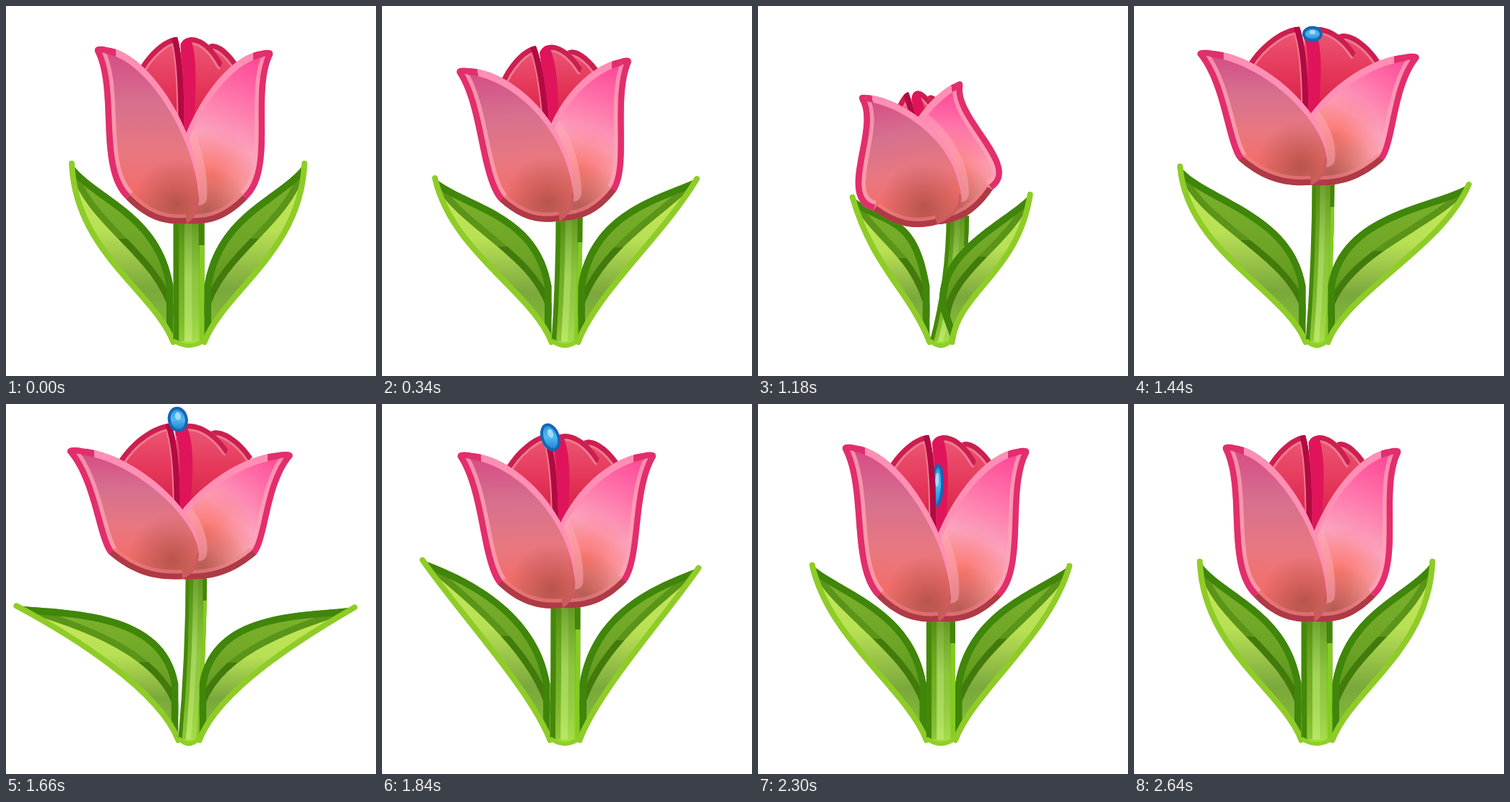
Write an HTML page with a canvas that moves like this. It is 512x512 px and loops after 2.68 s.

```html
<!DOCTYPE html>
<html>
<head>
<meta charset="utf-8">
<title>Tulip</title>
<style>
html, body { margin: 0; height: 100%; overflow: hidden; background: #fff; }
canvas { display: block; width: 512px; height: 512px; }
</style>
</head>
<body>
<canvas id="stage" width="512" height="512"></canvas>
<script>
const ctx = document.getElementById('stage').getContext('2d');
const LOOP = 2680, GROUND = 465, ROOT = 253;
ctx.lineJoin = 'round';

// head: base x, y, tilt, petal height, spread, waist, bulge, overlap, cross height, back height
// leaves: tip x, y, droop, fold; stem: top x, width
const rest = {
  head: [250, 301, 0, 238, 123, 84, 44, 17, 124, 260],
  leafL: [91, 218, 0, 0], leafR: [413, 218, 0, 0], stem: [253, 43]
};
const lean = {
  head: [246, 297, -.083, 215, 121, 81, 26, 22, 138, 246],
  leafL: [73, 238, .4, 0], leafR: [436, 239, .9, 0], stem: [259, 37]
};
const bud = {
  head: [250, 341, -.3, 192, 13, 72, 78, 53, 150, 165],
  leafL: [176, 300, .9, 0], leafR: [315, 274, 0, 1], stem: [287, 31]
};
const open = {
  head: [245, 248, 0, 180, 153, 100, 19, 22, 97, 221],
  leafL: [64, 222, .1, 0], leafR: [463, 247, .7, 0], stem: [262, 31]
};
const settled = {
  head: [250, 282, -.02, 211, 137, 89, 25, 18, 127, 243],
  leafL: [56, 216, 1, 0], leafR: [438, 227, 1, 0], stem: [254, 41]
};
const drip = {
  head: [250, 301, 0, 238, 129, 86, 40, 17, 121, 260],
  leafL: [75, 223, .4, 0], leafR: [431, 224, .5, 0], stem: [253, 40]
};

const blend = (a, b, k) => Object.fromEntries(Object.keys(a).map(
  n => [n, a[n].map((v, i) => v + (b[n][i] - v) * k)]));
const wide = {
  ...blend(settled, open, 1.4), leafL: [10, 288, 1.6, 0], leafR: [490, 290, 1.6, 0]
};
const poses = [
  [0, rest], [180, blend(settled, open, .55)], [340, lean],
  [540, blend(lean, bud, .82)], [740, bud], [900, blend(lean, bud, 1.04)],
  [1080, blend(bud, open, .2)], [1440, open], [1610, wide],
  [1840, settled], [2300, drip], [2640, rest], [LOOP, rest]
];
const tracks = Object.fromEntries(Object.keys(rest).map(
  n => [n, poses.map(([t, pose]) => [t, pose[n]])]));

// Drop: centre, radii, tilt
const dropTrack = [
  [1300, [248, 90, 9, 14, 0]], [1440, [247, 39, 12, 9, 0]], [1630, [239, 20, 12, 15, -.15]],
  [1840, [233, 46, 11, 18, -.35]], [2300, [248, 113, 7, 28, .05]], [2560, [247, 200, 5, 20, 0]]
];

// Smooth interpolation through timed keys, at rest at both ends
function sample(keys, t) {
  let i = 0;
  while (i < keys.length - 2 && t >= keys[i + 1][0]) i++;
  const [t0, a] = keys[i], [t1, b] = keys[i + 1], d = t1 - t0, s = (t - t0) / d;
  const slope = (j, n) => j < 1 || j > keys.length - 2 ? 0 :
    (keys[j + 1][1][n] - keys[j - 1][1][n]) / (keys[j + 1][0] - keys[j - 1][0]);
  return a.map((v, n) => v + (b[n] - v) * s * s * (3 - 2 * s)
    + d * s * (1 - s) * ((1 - s) * slope(i, n) - s * slope(i + 1, n)));
}

const add = ([x, y], dx, dy) => [x + dx, y + dy];
const middle = (a, b) => [(a[0] + b[0]) / 2, (a[1] + b[1]) / 2];
const bezier = (a, b, c, d) => `M${a}C${b} ${c} ${d}`;
function stroke(shape, color, width) {
  ctx.strokeStyle = color;
  ctx.lineWidth = width;
  ctx.stroke(new Path2D(shape));
}
function fill(shape, color) {
  ctx.fillStyle = color;
  ctx.fill(new Path2D(shape));
}
function clipped(shape, draw) {
  ctx.save();
  ctx.clip(new Path2D(shape));
  draw();
  ctx.restore();
}
function linear(x0, y0, x1, y1, stops) {
  const g = ctx.createLinearGradient(x0, y0, x1, y1);
  stops.forEach(([at, color]) => g.addColorStop(at, color));
  return g;
}
const vertical = (y0, y1, stops) => linear(0, y0, 0, y1, stops);
function glow(shape, x, y, r, rgb, alpha) {
  const g = ctx.createRadialGradient(x, y, 0, x, y, r);
  g.addColorStop(0, `rgba(${rgb},${alpha})`);
  g.addColorStop(1, `rgba(${rgb},0)`);
  fill(shape, g);
}

function leaf(side, [x, y, droop, fold], stemWidth) {
  const tip = [x, y], base = [ROOT + side * stemWidth / 2, GROUND];
  const joint = add(base, -side * 28 * fold, -78 + 58 * fold);
  const up1 = add(tip, -side * (35 + 25 * droop), 47 - 25 * droop);
  const up2 = add(joint, side * (17 - 52 * fold), -103 + 38 * fold);
  const low1 = add(tip, -side * (5 + 45 * droop), 122 - 50 * droop);
  const low2 = add(base, side * (27 - 33 * fold), -70);
  const upper = bezier(tip, up1, up2, joint), lower = bezier(tip, low1, low2, base);
  const rib = bezier(tip, middle(up1, low1), middle(up2, low2), middle(joint, base));
  const back = `L${base}L${joint}C${up2} ${up1} ${tip}Z`;
  clipped(lower + back, () => {
    fill(lower + back, vertical(y, 450,
      [[0, '#c6ea5a'], [.4, '#b8e054'], [.75, '#7aa83c'], [1, '#82bc34']]));
    fill(rib + back, vertical(y, 450, [[0, '#7db42c'], [.5, '#6ea426'], [1, '#4a8a10']]));
    stroke(rib, vertical(y, GROUND,
      [[0, '#5a9418'], [.42, '#5a9418'], [.42, '#427a0c'], [1, '#427a0c']]), 9);
    stroke(upper + `L${base}`, '#3f860a', 19);
  });
  ctx.lineCap = 'round';
  stroke(lower, '#8fcc28', 8);
}

function stem([tx, width], ty) {
  const strip = (a, b, color) => {
    const my = (ty + GROUND) / 2, top = f => tx + f * width, root = f => ROOT + f * width;
    fill(`M${top(a)},${ty}Q${top(a)},${my} ${root(a)},${GROUND}
      H${root(b)}Q${top(b)},${my} ${top(b)},${ty}Z`, color);
  };
  strip(-.5, .5, '#458808');
  strip(-.32, .35, '#76b428');
  strip(-.14, .35, '#98d048');
  strip(-.14, .1, '#b2e268');
  strip(.32, .5, vertical(ty, ty + 60,
    [[0, '#45860a'], [.7, '#45860a'], [.7, '#85cc20'], [1, '#85cc20']]));
  strip(-.32, .35, vertical(ty, GROUND,
    [[0, 'rgba(50,105,0,.6)'], [.5, 'rgba(80,140,10,.15)'], [1, 'rgba(200,245,90,.3)']]));
  const cap = `M${ROOT - width / 2 + 2},464Q${ROOT},476 ${ROOT + width / 2 - 2},464`;
  fill(cap, '#a4e040');
  stroke(cap, '#8fd028', 6);
}

function drop([x, y, rx, ry, tilt]) {
  const oval = (dy, k) => {
    const p = new Path2D();
    p.ellipse(x, y + dy * ry, rx * k, ry * k, tilt, 0, 7);
    return p;
  };
  fill(oval(0, 1), vertical(y - ry, y + ry, [[0, '#2f92dc'], [.5, '#52b8f0'], [1, '#1c7ccc']]));
  stroke(oval(0, 1), '#1566b4', 4);
  fill(oval(-.3, .35), '#9fdcfa');
}

// The head is drawn with its base at the origin and y pointing up
function inHead([x, y, tilt], side, draw) {
  ctx.save();
  ctx.translate(x, y);
  ctx.rotate(tilt);
  ctx.scale(side, -1);
  draw();
  ctx.restore();
}

function backPetals(head, t) {
  const r = head[4] * .56, foot = [-4, head[8] - 30], top = head[9];
  const at = (u, drop) => [u * r, top - drop];
  const lobe = edge => {
    const shape = edge + `L${foot}Z`;
    clipped(shape, () => {
      fill(shape, vertical(top, foot[1], [[0, '#ee5a78'], [.45, '#e43558'], [1, '#d0103f']]));
      stroke(edge, '#ee7a90', 20);
      stroke(edge, '#cc1f50', 14);
    });
    return shape;
  };
  const peak = at(-.19, 2), seam = `${at(-.02, 40)} ${foot}`;
  const dropNow = t > 1300 && t < 2560 && sample(dropTrack, t);
  const onTop = t > 1600 && t < 2050;
  inHead(head, 1, () => {
    lobe(bezier(at(.44, 13), at(.6, 6), at(.9, 22), at(1.1, 48)));
    const front = lobe(bezier(at(-.12, 12), at(0, -6), at(.42, 0), at(.72, 38)));
    clipped(front, () => stroke(`M${at(-.02, 12)}Q${at(.14, 50)} ${foot}`, '#e0145a', 18));
  });
  if (dropNow && !onTop) drop(dropNow);
  inHead(head, 1, () => {
    const left = lobe(bezier(at(-1.04, 56), at(-.8, 22), at(-.42, 2), peak) + `Q${seam}`);
    clipped(left, () => stroke(`M${peak}Q${seam}`, '#b20a42', 16));
  });
  if (dropNow && onTop) drop(dropNow);
}

function petal(head, side, paint) {
  let [, , , height, spread, waist, bulge, overlap, cross] = head;
  spread -= side * 4;
  if (side > 0) height -= 5;
  const tip = [spread, height], corner = [waist, 34], fold = [-overlap, 36];
  const tipIn = [spread * .87, height + 6];
  const in1 = [-1.35 * overlap, cross - 5], in2 = [spread * .4, height];
  const sideEdge = bezier(corner, [waist + bulge, height * .32], [spread * .78, height * .77], tip);
  const tipEdge = `Q${spread + 2},${height + 10} ${tipIn}`;
  const bottom = `C${waist * .4},-3 ${waist * .7},8 ${corner}`;
  const crease = `M${fold}Q${-overlap},10 0,0`;
  const shape = crease + bottom + sideEdge.replace(/^M[^C]*/, '') + tipEdge + `C${in2} ${in1} ${fold}Z`;
  inHead(head, side, () => clipped(shape, () => {
    paint(shape, height);
    if (side > 0) {
      stroke(bezier([overlap, 36], [-in1[0], in1[1]], [-in2[0], in2[1]], [-tipIn[0], tipIn[1]]),
        'rgba(255,170,185,.5)', 22);
    }
    ctx.lineCap = 'butt';
    stroke(sideEdge, 'rgba(255,165,185,.75)', 28);
    stroke('M0,0' + bottom, 'rgba(245,130,140,.5)', 26);
    stroke(crease, '#cc5a60', 7);
    stroke('M0,0' + bottom, '#ae3a46', 16);
    const band = bezier(fold, in1, in2, tipIn)
      + `L${add(tipIn, 2, -9)}C${add(in2, 3, -11)} ${add(in1, 10, -4)} ${fold}Z`;
    fill(band, linear(0, 0, spread, 0,
      [[0, '#ff8fb4'], [.77, '#ff8fb4'], [.77, '#e22e6c'], [1, '#e22e6c']]));
    stroke(sideEdge + tipEdge, '#e22e6c', 17);
  }));
}

function draw(t) {
  const pose = Object.fromEntries(Object.keys(tracks).map(n => [n, sample(tracks[n], t)]));
  const { head, leafL, leafR } = pose, stemWidth = pose.stem[1];
  ctx.clearRect(0, 0, 512, 512);
  leaf(-1, leafL, stemWidth);
  stem(pose.stem, head[1] - 12);
  backPetals(head, t);
  petal(head, 1, (shape, height) => {
    fill(shape, linear(head[4], height, 20, 0,
      [[0, '#ff3f94'], [.25, '#ff6aa6'], [.55, '#fba3bd'], [.78, '#f59a9c'], [1, '#d8706a']]));
    glow(shape, 34, 68, 62, '255,95,75', .6);
    glow(shape, 28, 18, 62, '140,60,50', .5);
  });
  petal(head, -1, (shape, height) => {
    fill(shape, vertical(height, 0,
      [[0, '#d64c86'], [.3, '#d6708e'], [.58, '#e87880'], [.8, '#f26e6c'], [1, '#de6a64']]));
    glow(shape, 14, 28, 62, '135,60,50', .5);
  });
  leaf(1, leafR, stemWidth);
}

function tick() {
  draw(performance.now() % LOOP);
  requestAnimationFrame(tick);
}
tick();
</script>
</body>
</html>
```
